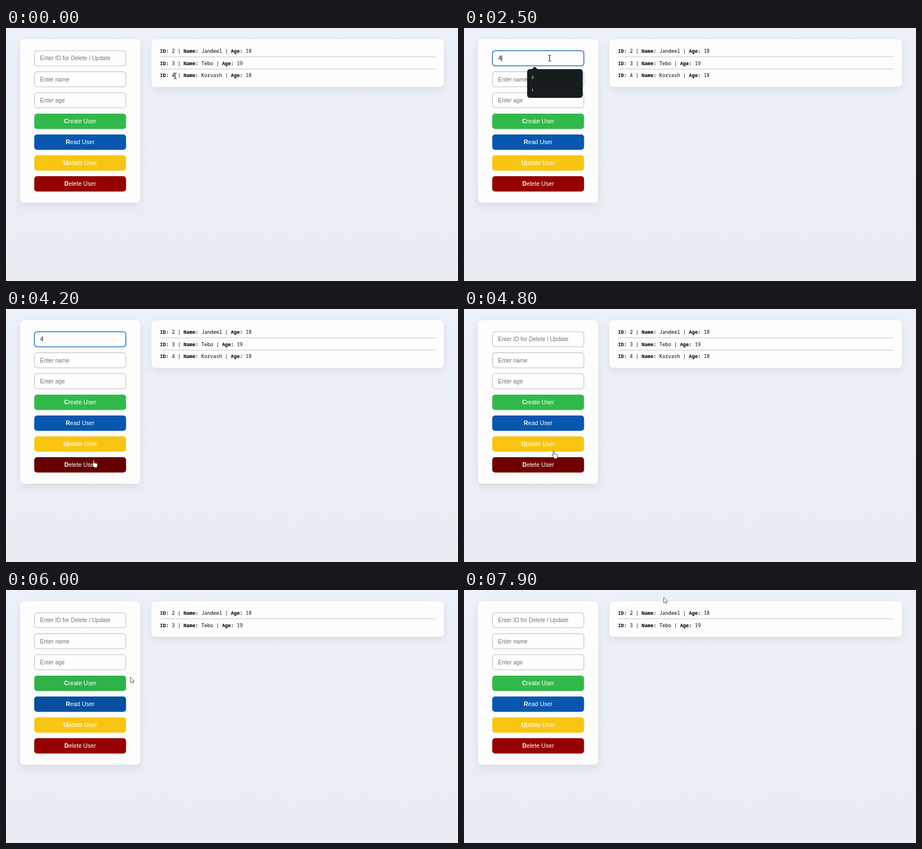
These frames come from a looping animation (800 px wide and 449 px high, 8 s). An HTML page:

```html
<!DOCTYPE html>
<html lang="en">
<head>
<meta charset="utf-8">
<title>User manager</title>
<style>
  html, body { margin: 0; height: 100%; overflow: hidden; background: #ebeef6; }
  svg { display: block; width: 100vw; height: 100vh; }
  text { font: 10.1px "Liberation Sans", Arial, sans-serif; white-space: pre; }
  .panel { fill: #fdfdfe; filter: drop-shadow(0 5px 7px rgba(0, 0, 0, .08)); }
  .field { fill: #fefeff; stroke: #cbcbcf; stroke-width: 1.3; }
  .hint { fill: #757575; }
  .label { font-size: 10.6px; fill: #fff; text-anchor: middle; }
  .row { font: 8.72px "Noto Sans Mono", monospace; }
  .menu text { font: 8px "Open Sans", sans-serif; fill: #fff; }
  .bold { font-weight: 700; }
</style>
</head>
<body>
<svg viewBox="0 0 800 449" preserveAspectRatio="none">
  <defs>
    <linearGradient id="bg" x2="0" y2="1">
      <stop stop-color="#ecf0f8"/><stop offset="1" stop-color="#eaedf4"/>
    </linearGradient>
  </defs>
  <rect width="800" height="449" fill="url(#bg)"/>
  <rect class="panel" x="25" y="20" width="212.5" height="290" rx="7"/>
  <rect class="panel" id="output" x="257.5" y="20" width="517.5" rx="7"/>
  <g id="rows"></g>
  <g id="form"></g>
  <text id="value" x="60.5" y="57.3" fill="#111">4</text>
  <rect id="caret" y="48.3" width="1" height="11" fill="#111"/>
  <g id="menu" class="menu">
    <path d="M119 74L125 68.5L131 74Z" fill="#171c1e"/>
    <rect x="111.7" y="73" width="98.5" height="51" rx="5" fill="#171c1e"/>
    <text x="119" y="90">3</text>
    <text x="119" y="112.5">1</text>
  </g>
  <g id="cursor">
    <path id="arrow" d="M0 0V10L2.3 7.9L4 11.4L5.6 10.7L4 7.3H7Z" fill="#fff" stroke="#444" stroke-width=".8"/>
    <path id="beam" d="M-2.5 -5H-.6L0 -4.5L.6 -5H2.5M0 -4.5V4.5M-2.5 5H-.6L0 4.5L.6 5H2.5" fill="none" stroke="#111"/>
    <path id="hand" d="M-1 1Q0 -.6 1 1V5L5.5 6Q7.3 6.5 7 8.5L6 11.5V13.5H.3V11.8L-3 8Q-3.4 6.4 -1 7.5Z" fill="#fff" stroke="#222" stroke-width=".8"/>
  </g>
</svg>
<script>
const LOOP = 8000, LEFT = 50, RIGHT = 212.5;
const FOCUS = 1400, TYPED = 2450, MENU_END = 2600, DELETED = 4600, READ = 5250;
const $ = id => document.getElementById(id);
const show = (id, on) => $(id).setAttribute("visibility", on ? "visible" : "hidden");
const clamp = v => Math.max(0, Math.min(1, v));
const ease = v => v * v * (3 - 2 * v);
const bold = s => `<tspan class="bold">${s}</tspan>`;

const fields = [["Enter ID for Delete / Update", 40.3], ["Enter name", 77.5], ["Enter age", 114.7]];
const buttons = [
  ["Create User", 152, [51, 185, 75], [33, 136, 56]],
  ["Read User", 189, [7, 87, 175], [0, 64, 133]],
  ["Update User", 226, [248, 198, 18], [224, 168, 0]],
  ["Delete User", 263, [149, 0, 0], [100, 0, 0]]
];
const users = [[2, "Jandeel", 18], [3, "Tebo", 19], [4, "Korvash", 18]];

// time, x, y of the pointer's hot spot
const path = [
  [0, 299.5, 85], [300, 297, 84], [1100, 155, 55], [1500, 151.5, 53.5], [2700, 151.5, 53.5],
  [3300, 140, 102], [3600, 146, 231], [4000, 155, 268], [4700, 155.5, 268.5],
  [5000, 168, 206], [5250, 178, 206], [5400, 185.5, 218], [5700, 190, 214],
  [6300, 250, 95], [6700, 275.5, 49.5], [6950, 431, 52], [7200, 366, 17], [7900, 353.5, 13], [LOOP, 353.5, 13]
];

$("form").innerHTML = fields.map(([hint, y], i) =>
  `<rect class="field" id="field${i}" x="50.4" y="${y}" width="161.8" height="26.9" rx="5"/>
   <text class="hint" id="hint${i}" x="60.3" y="${y + 17}">${hint}</text>`).join("") +
  buttons.map(([label, y], i) =>
  `<rect id="button${i}" x="${LEFT}" y="${y}" width="162.5" height="27.3" rx="5"/>
   <text class="label" x="131.2" y="${y + 17.3}">${bold(label[0])}${label.slice(1)}</text>`).join("");

$("rows").innerHTML = users.map(([id, name, age], i) => {
  const y = 44 + i * 21.6;
  const line = i ? `<path d="M272.5 ${y - 14.4}H760" stroke="#cfcfd1" stroke-width="1.3"/>` : "";
  return `<g id="row${i}">${line}<text class="row" x="272.5" y="${y}">${bold("ID:")} ${id} | ${bold("Name:")} ${name} | ${bold("Age:")} ${age}</text></g>`;
}).join("");

function pointer(t) {
  const i = Math.max(1, path.findIndex(p => p[0] >= t));
  const [t0, x0, y0] = path[i - 1], [t1, x1, y1] = path[i];
  const k = ease(clamp((t - t0) / (t1 - t0)));
  return [x0 + (x1 - x0) * k, y0 + (y1 - y0) * k];
}

const inBox = ([x, y], top, height = 27.3) => x > LEFT && x < RIGHT && y > top && y < top + height;

// Averaging recent hover states gives a 200 ms linear transition.
function hover(t, top) {
  let sum = 0;
  for (let i = 0; i < 20; i++) sum += inBox(pointer(Math.max(0, t - i * 10)), top);
  return sum / 20;
}

function shape(p, rowCount) {
  if (buttons.some(b => inBox(p, b[1]))) return "hand";
  const overText = users.some((u, i) => i < rowCount && p[0] > 272 && p[0] < 435 && Math.abs(p[1] - 41 - i * 21.6) < 5.5);
  return overText || fields.some(f => inBox(p, f[1])) ? "beam" : "arrow";
}

function draw(t) {
  const focused = t >= FOCUS && t < DELETED, typed = t >= TYPED && t < DELETED;
  $("field0").style.stroke = focused ? "#0b5cab" : "";
  show("hint0", !typed);
  show("value", typed);
  show("menu", t >= FOCUS && t < MENU_END);
  const blink = Math.floor((t - (typed ? TYPED : FOCUS)) / 500) % 2 === 0;
  show("caret", focused && blink);
  $("caret").setAttribute("x", typed ? 66.2 : 60.3);

  buttons.forEach(([, y, base, dark], i) => {
    const k = hover(t, y);
    $("button" + i).setAttribute("fill", `rgb(${base.map((c, j) => Math.round(c + (dark[j] - c) * k))})`);
  });

  const rowCount = t < READ ? 3 : 2;
  $("output").setAttribute("height", 84.5 - 21.5 * ease(clamp((t - READ) / 170)));
  $("rows").setAttribute("opacity", t < READ ? 1 : clamp((t - 5400) / 300));
  show("row2", rowCount === 3);

  const p = pointer(t), kind = shape(p, rowCount);
  $("cursor").setAttribute("transform", `translate(${p})`);
  for (const id of ["arrow", "beam", "hand"]) show(id, id === kind);
}

const start = performance.now();
function tick() {
  draw((performance.now() - start) % LOOP);
  requestAnimationFrame(tick);
}
tick();
</script>
</body>
</html>
```
